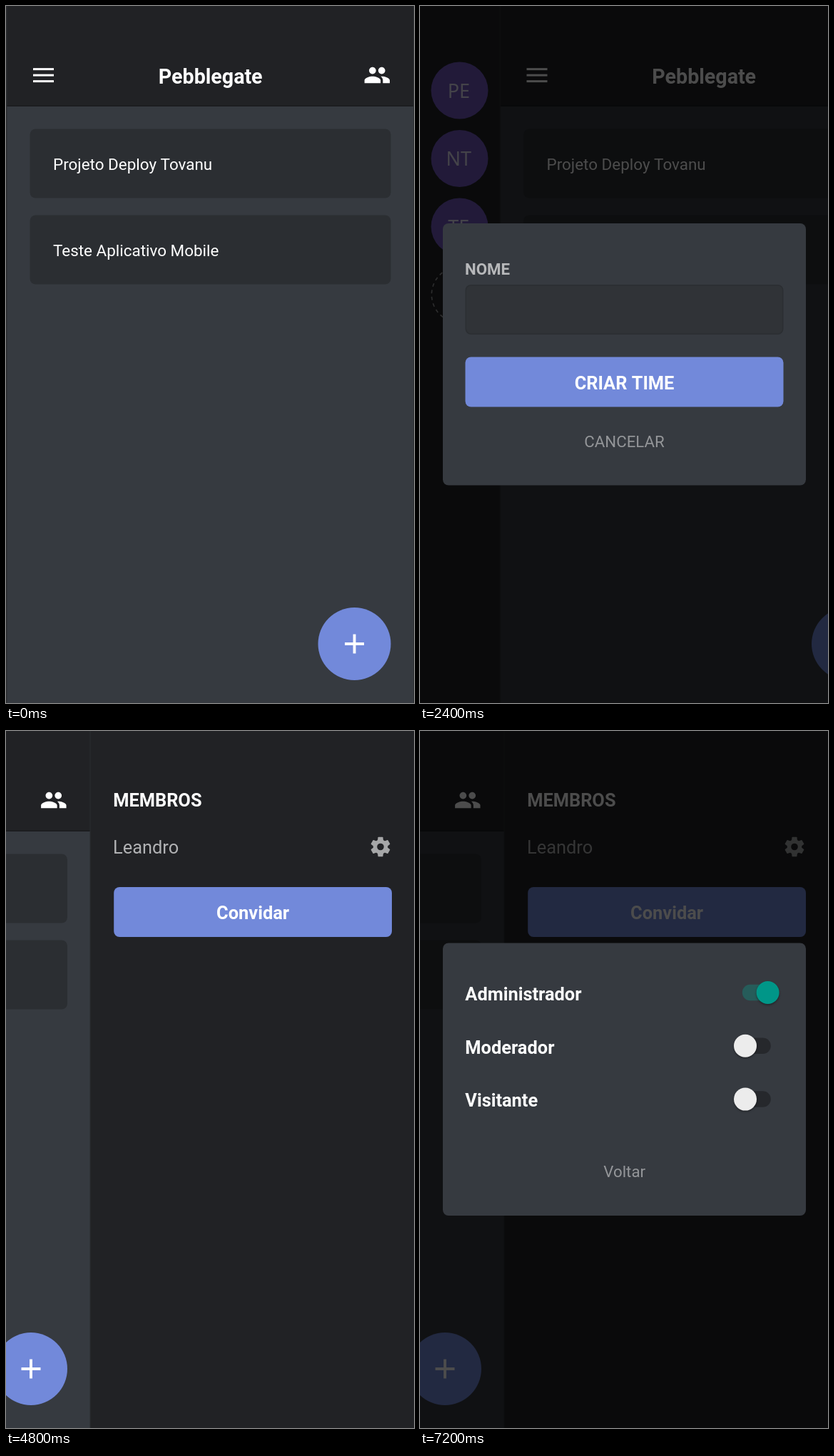
An HTML page with a canvas for the animation above (8.4 s loop, 572x978 px).

```html
<!DOCTYPE html>
<html lang="pt-BR">
<head>
<meta charset="utf-8">
<style>
  html, body { margin: 0; height: 100%; overflow: hidden; background: #212225; }
  canvas { display: block; }
</style>
</head>
<body>
<canvas width="572" height="978"></canvas>
<script>
const W = 572, H = 978, HOLD = 1200;
const DARK = '#212225', BODY = '#363a40', CARD = '#2b2e32', EDGE = '#2b2d30',
      BLUE = '#7289da', PURPLE = '#7159c1', TEAL = '#009688', WHITE = '#fff';
const ctx = document.querySelector('canvas').getContext('2d');

const GROUP = new Path2D('M16 11c1.66 0 2.99-1.34 2.99-3S17.66 5 16 5s-3 1.34-3 3 1.34 3 3 3z' +
  'M8 11c1.66 0 2.99-1.34 2.99-3S9.66 5 8 5 5 6.34 5 8s1.34 3 3 3z' +
  'M8 13c-2.33 0-7 1.17-7 3.5V19h14v-2.5c0-2.33-4.67-3.5-7-3.5z' +
  'M16 13c-.29 0-.62.02-.97.05 1.16.84 1.97 1.97 1.97 3.45V19h6v-2.5c0-2.33-4.67-3.5-7-3.5z');
const TOOTH = new Path2D('M-2.9-5L-2.9-7 -2.5-9.6Q-2.4-10-2-10H2Q2.4-10 2.5-9.6L2.9-7V-5z');

function rect(x, y, w, h, fill, radius = 0) {
  ctx.fillStyle = fill;
  ctx.beginPath();
  ctx.roundRect(x, y, w, h, radius);
  ctx.fill();
}

function disc(x, y, r, fill) {
  ctx.fillStyle = fill;
  ctx.beginPath();
  ctx.arc(x, y, r, 0, 7);
  ctx.fill();
}

function text(str, x, y, size, { color = WHITE, bold = false, align = 'left', font = 'Roboto' } = {}) {
  ctx.font = `${bold ? 700 : 400} ${size}px "${font}", sans-serif`;
  ctx.textAlign = align;
  ctx.fillStyle = color;
  ctx.fillText(str, x, y);
}

function plus(x, y, size, weight, color) {
  rect(x - size / 2, y - weight / 2, size, weight, color);
  rect(x - weight / 2, y - size / 2, weight, size, color);
}

function button(label, x, y, w) {
  rect(x, y, w, 70, BLUE, 8);
  text(label, x + w / 2, y + 45.3, 25.4, { bold: true, align: 'center' });
}

function at(x, y, scale, paint) {
  ctx.save();
  ctx.translate(x, y);
  ctx.scale(scale, scale);
  paint();
  ctx.restore();
}

function gear(x, y, color) {
  at(x, y, 1.37, () => {
    ctx.fillStyle = ctx.strokeStyle = color;
    ctx.lineWidth = 4;
    ctx.beginPath();
    ctx.arc(0, 0, 5.5, 0, 2 * Math.PI);
    ctx.stroke();
    for (let i = 0; i < 6; i++) {
      ctx.fill(TOOTH);
      ctx.rotate(Math.PI / 3);
    }
  });
}

function teams() {
  ['PE', 'NT', 'TE'].forEach((initials, i) => {
    const y = 118.5 + i * 95.5;
    disc(55.5, y, 40, PURPLE);
    text(initials, 54.3, y + 10, 27, { color: '#e6e1f5', align: 'center', font: 'Noto Sans' });
  });
  ctx.save();
  ctx.strokeStyle = '#97989a';
  ctx.lineWidth = 1.6;
  ctx.setLineDash([4.8, 4.8]);
  ctx.beginPath();
  ctx.arc(55.5, 405, 39.2, 0, 2 * Math.PI);
  ctx.stroke();
  ctx.restore();
  plus(55.5, 405, 22.5, 3.2, '#97989a');
}

function members() {
  text('MEMBROS', 150.2, 106, 25.4, { bold: true });
  text('Leandro', 150, 172, 25.4, { color: '#b1b2b4' });
  gear(525, 162.5, '#a6a7a8');
  button('Convidar', 151.2, 219, 389.8);
}

function projects(offset) {
  at(offset, 0, 1, () => {
    rect(0, 0, W, H, EDGE);
    rect(1.5, 0, W - 2.5, 140, DARK);
    rect(1.5, 141, W - 2.5, H, BODY);
    rect(1.5, 139.3, W - 2.5, 1.7, '#1b1c1f');
    for (const y of [88.6, 97.1, 105.6]) rect(38, y - 1.5, 29, 3, WHITE);
    text('Pebblegate', 286.7, 109, 28.6, { bold: true, align: 'center' });
    at(520.3 - 19.3, 97 - 19.3, 1.61, () => {
      ctx.fillStyle = WHITE;
      ctx.fill(GROUP);
    });
    ['Projeto Deploy Tovanu', 'Teste Aplicativo Mobile'].forEach((name, i) => {
      const y = 172.5 + i * 121;
      rect(33.5, y, 506, 97, CARD, 8);
      text(name, 66, y + 57.7, 22.45);
    });
    disc(488.5, 895, 51, BLUE);
    plus(488.5, 895, 27, 3.9, WHITE);
  });
}

function dialog(y, h) {
  rect(0, 0, W, H, 'rgba(0,0,0,.7)');
  rect(32, y, 509, h, BODY, 8);
}

function form(label, action, caret) {
  dialog(305, 367.5);
  text(label, 63, 376.7, 22.25, { bold: true, color: '#b7b8ba' });
  rect(63.5, 391, 446, 70, CARD, 8);
  rect(65, 392.5, 443, 67, '#303337', 6.5);
  if (caret) rect(79.6, 410, 2.4, 30, TEAL);
  button(action, 63.5, 492.5, 446);
  text('CANCELAR', 286.5, 618.5, 22.25, { color: '#949699', align: 'center' });
}

function roles() {
  dialog(297.5, 382.5);
  ['Administrador', 'Moderador', 'Visitante'].forEach((role, i) => {
    const y = 367 + i * 74.8, on = i === 0;
    text(role, 63.3, y + 10.7, 25.4, { bold: true });
    rect(451.8, y - 11.3, 40, 22.5, on ? '#265c5a' : '#26282c', 11.2);
    ctx.save();
    ctx.shadowColor = 'rgba(0,0,0,.4)';
    ctx.shadowBlur = 3;
    ctx.shadowOffsetY = 1.5;
    disc(on ? 487.6 : 456, y, 16, on ? TEAL : '#ececec');
    ctx.restore();
  });
  text('Voltar', 286.7, 625.7, 22.25, { color: '#949699', align: 'center' });
}

const LEFT_OPEN = 111.5, RIGHT_OPEN = -453.5;
const scenes = [
  { offset: 0 },
  { offset: LEFT_OPEN },
  { offset: LEFT_OPEN, modal: () => form('NOME', 'CRIAR TIME') },
  { offset: 0, modal: () => form('NOME', 'CRIAR PROJETO') },
  { offset: RIGHT_OPEN },
  { offset: RIGHT_OPEN, modal: () => form('E-MAIL', 'CONVIDAR', true) },
  { offset: RIGHT_OPEN, modal: roles },
];

function draw() {
  const { offset, modal } = scenes[Math.floor(performance.now() / HOLD) % scenes.length];
  rect(0, 0, W, H, DARK);
  if (offset > 0) teams();
  if (offset < 0) members();
  projects(offset);
  if (modal) modal();
  requestAnimationFrame(draw);
}
draw();
</script>
</body>
</html>
```
